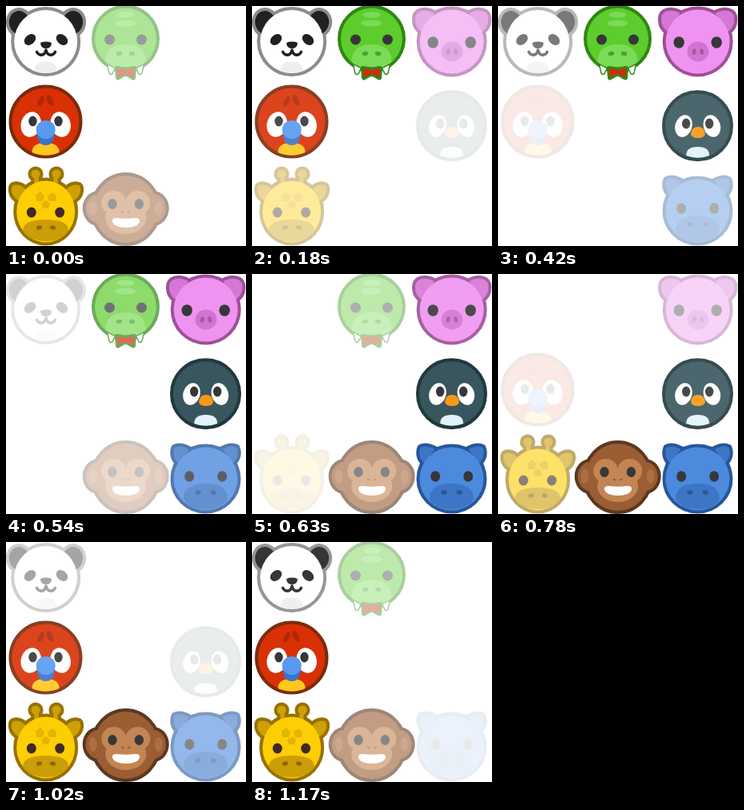
Recreate the animation shown at these times as an HTML page. Size 300 by 300 pixels, loop 1.2 s.

```html
<!DOCTYPE html>
<html lang="en">
<head>
<meta charset="utf-8">
<title>Animal ring</title>
<style>
html, body { margin: 0; width: 100%; height: 100%; overflow: hidden; background: #fff; }
svg { display: block; width: 100vw; height: 100vh; }
</style>
</head>
<body>
<svg id="stage" viewBox="0 0 300 300"></svg>
<script>
const LOOP = 1200, STEP = 30, FADE = 300;
const INK = '#37373a';

const oval = (x, y, rx, ry, fill = '', turn = 0) =>
  `<ellipse cx="${x}" cy="${y}" rx="${rx}" ry="${ry}"` +
  (fill && ` fill="${fill}"`) + (turn ? ` transform="rotate(${turn} ${x} ${y})"` : '') + '/>';
const dot = (x, y, r, fill) => oval(x, y, r, r, fill);
const path = (d, fill = '') => `<path d="${d}"${fill && ` fill="${fill}"`}/>`;
const line = (d, color, w) =>
  `<path d="${d}" fill="none" stroke="${color}" stroke-width="${w}" stroke-linecap="round" stroke-linejoin="round"/>`;
// two ovals mirrored about the vertical line x = c
const pair = (c, dx, y, rx, ry, fill, turn = 0) =>
  oval(c - dx, y, rx, ry, fill, turn) + oval(c + dx, y, rx, ry, fill, -turn);
// a shape and its mirror image about x = c, drawn relative to c
const mirror = (c, shape) =>
  `<g transform="translate(${c})">${shape}<g transform="scale(-1 1)">${shape}</g></g>`;
// head and ears inside one shared rim
const body = (ears, head, rim, fill, earFill = fill) =>
  `<g stroke="${rim}" fill="${rim}" stroke-width="8" stroke-linejoin="round">${ears}${head}</g>` +
  `<g fill="${earFill}">${ears}</g><g fill="${fill}">${head}</g>`;
// rounded patch sitting on the lower edge of a head
const chin = (x, y, w, h, r, fill) =>
  path(`M${x - w} ${y}Q${x - w} ${y - h} ${x} ${y - h}T${x + w} ${y}A${r} ${r} 0 0 1 ${x - w} ${y}Z`, fill);

const panda =
  body(pair(50, 33, 21, 13, 15, '', -15), oval(49.7, 44.5, 39.5, 39.5), '#8c8c8c', '#fff', '#212121') +
  chin(49.5, 81.5, 14, 12, 40, '#eee') +
  pair(50, 20, 42, 6, 8, '#212121', 50) +
  path('M43 47Q43 44.5 50 44.5T57 47Q56 53 50 53T43 47Z', '#212121') +
  line('M38.5 57.5Q41 62 45.5 61Q49 60 50 55Q51 60 54.5 61Q59 62 61.5 57.5', '#212121', 3.6);

const snake =
  body('', dot(149.5, 41, 38.5), '#2f8713', '#5ccd2d') +
  oval(149.5, 11, 11, 3.8, '#7bdb57') + oval(149.5, 21.5, 13, 4, '#7bdb57') +
  chin(149.5, 70, 25, 22, 38.5, '#7bdb57') +
  pair(149.5, 20, 42, 6.5, 6.5, INK) +
  pair(149.5, 8, 59.5, 3.8, 2.6, '#41a82a', -15) +
  `<g stroke="#2f8713" stroke-width="6" stroke-linejoin="round" paint-order="stroke">` +
  path('M139 78Q149.5 81 160 78L159 89.5L149.5 84L140 89.5Z', '#d8280e') + '</g>' +
  `<g stroke="#2f8713" stroke-width="3" stroke-linejoin="round" paint-order="stroke">` +
  mirror(149.5, path('M-22 74L-14 78L-17 84Q-19 86 -20 83Z', '#fff')) + '</g>';

const pig =
  body(mirror(249.7, path('M-42 8Q-34 3 -22 9L-34 34Q-47 28 -45.5 14Q-45 10 -42 8Z')),
    dot(249.7, 44.5, 40), '#9c5197', '#f093f0', '#d676d5') +
  pair(249.7, 23.5, 45.5, 6.7, 7.3, INK) +
  oval(250, 57, 13.5, 12.5, '#d273d1') +
  pair(250, 4.8, 57, 2.4, 3.8, '#a9559f', 12);

const penguin =
  body('', dot(249.5, 149.7, 40.5), '#20393f', '#38565d') +
  pair(249.7, 17.7, 150, 10.5, 14, '#fff', 16) +
  pair(249.7, 14.5, 147, 5.2, 6.5, INK) +
  path('M241 160Q242 151 250 151T259 160Q258 165 250 165T241 160Z', '#f9980f') +
  chin(249.7, 187, 14.5, 11, 41, '#e3f2fb');

const hippo =
  body(mirror(249.5, path('M-39 217Q-32 213 -21 219L-34 237Q-43 228 -39 217Z')),
    oval(249.5, 256, 40, 39.5), '#27579a', '#4c8ade', '#3d76c5') +
  pair(249.7, 20.5, 253, 6, 6.7, INK) +
  path('M222 281Q222 262 249.5 262T277 281Q270 294 249.5 294T222 281Z', '#3d76c5') +
  pair(249.7, 9.7, 273, 3.8, 2.8, '#285a9f', -20);

const monkey =
  body(pair(149.7, 34, 253, 16, 18, ''), oval(149.7, 254, 40, 42), '#5c3820', '#9b5d33') +
  pair(149.7, 41, 253, 5, 9, '#ac6f43') +
  pair(149.7, 15, 246, 15.5, 15, '#c38554') +
  oval(149.7, 265, 25.5, 20, '#c38554') +
  pair(149.7, 16.7, 247.5, 5.7, 6.5, INK) +
  pair(149.7, 4, 257, 2, 1.2, '#94603a', 20) +
  path('M138 265Q150 266.5 162 265Q168 265 167 270Q164 277 150 277T133 270Q132 265 138 265Z', '#fff');

const giraffe =
  body(mirror(50, oval(-13, 210, 5.6, 5.6) + path('M-15 212H-10L-7 232H-14Z') +
      path('M-41 224Q-31 221 -22 233L-31 245Q-44 239 -43 228Q-43 225 -41 224Z')),
    oval(49.7, 257, 36.5, 38.5), '#967206', '#fdce04', '#cda006') +
  path('M37 236L43 232L48 237L46 244L38 244ZM52 237L58 233L63 237L62 244L54 244ZM44 247L50 243L55 247L53 253L46 253Z', '#e6b405') +
  pair(49.5, 17.7, 258, 6, 6.5, '#40291f') +
  path('M21 281Q21 267 49.7 267T78 281Q69 294 49.7 294T21 281Z', '#cb9d06') +
  pair(50, 8.5, 277, 3.7, 2.6, '#8f6b06', -20);

const parrot =
  body('', dot(49.5, 144.5, 42), '#7a2c0c', '#d93006') +
  oval(43.5, 119, 3.2, 7, '#b02806', 28) + oval(55, 118, 3.4, 7.5, '#b02806', -25) +
  pair(49.7, 18.5, 148, 12.5, 16, '#fff', 14) +
  pair(49.5, 16, 144, 5.2, 6.5, INK) +
  chin(49.5, 183, 17, 12, 42, '#fdc71c') +
  path('M38.5 157H61Q61 174 49.7 174T38.5 157Z', '#3b73c6') +
  oval(49.7, 154.5, 12, 11.5, '#579af0');

// clockwise from the top left
const ring = [panda, snake, pig, penguin, hippo, monkey, giraffe, parrot];
const stage = document.getElementById('stage');
stage.innerHTML = ring.map(art => `<g>${art}</g>`).join('');
const heads = [...stage.children];

// full for one quarter, then a linear fade out, a pause and a fade in
function visibility(p) {
  const away = Math.abs(p - FADE / 2);
  const near = Math.min(away, LOOP - away);
  return Math.max(0, Math.min(1, (FADE * 1.5 - near) / FADE));
}

function draw(ms) {
  const t = Math.floor((ms % LOOP) / STEP) * STEP;
  heads.forEach((head, i) => {
    const p = (t - i * LOOP / heads.length + LOOP) % LOOP;
    head.setAttribute('opacity', visibility(p));
  });
}

let start;
function tick(now) {
  start ??= now;
  draw(Math.max(0, now - start));
  requestAnimationFrame(tick);
}
draw(0);
requestAnimationFrame(tick);
</script>
</body>
</html>
```
